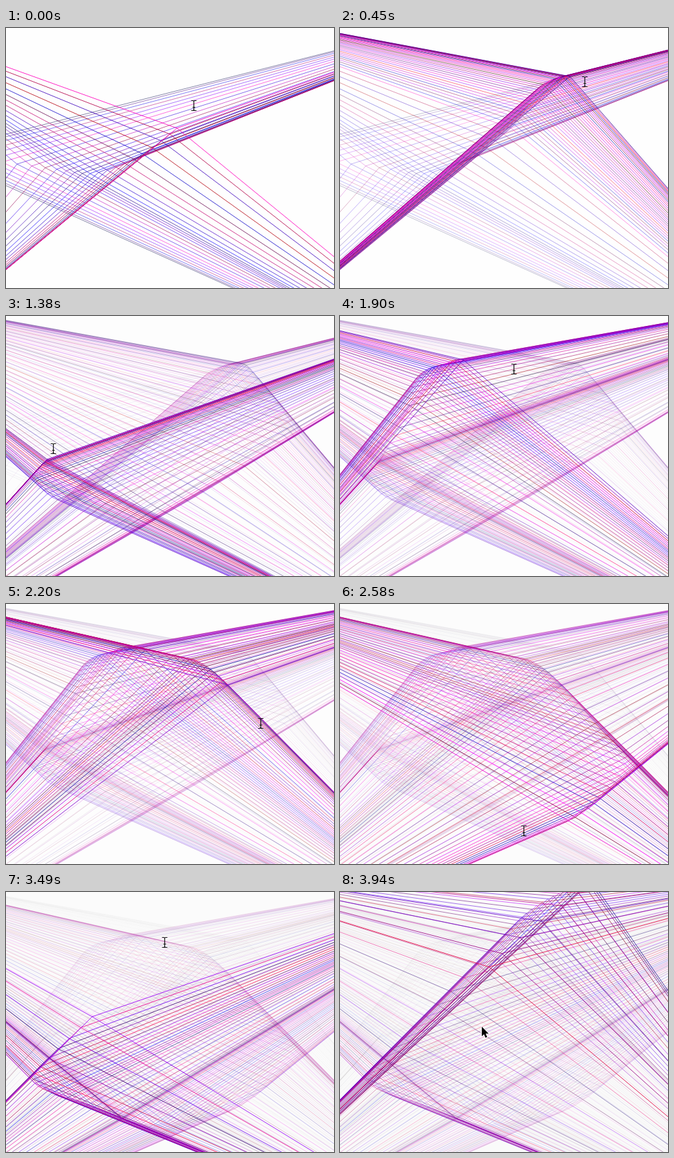
Animation of 495x392 px, one loop 4.04 s. Source, as an HTML page with a canvas:

```html
<!DOCTYPE html>
<html lang="en">
<head>
<meta charset="utf-8">
<title>Pointer lines</title>
<style>
html, body { margin: 0; width: 100%; height: 100%; overflow: hidden; background: #fefefe; }
canvas { display: block; }
</style>
</head>
<body>
<canvas id="stage" width="495" height="392"></canvas>
<script>
const W = 495, H = 392, LOOP = 4040;
const STEP_MS = 97, FIRST_STEP_MS = 22, LAST_STEP = 41;
const RAYS_PER_STEP = 6;
const ctx = document.getElementById('stage').getContext('2d');

// Far corners of the larger canvas that the stage looks into
const center = { x: 261, y: 279 }, reach = { x: 551, y: 325 };
const corners = [-1, 1].flatMap(sx => [-1, 1].map(sy =>
  [center.x + sx * reach.x, center.y + sy * reach.y]));

// The pointer passes the points of each leg at an even pace
const start = [-110, 188], end = [214, 203];
const legs = [
  { steps: 4, points: [[-30, 199], [70, 212], [132, 219], [195, 196], [258, 151]] },
  { steps: 10, points: [[284, 117], [300, 90], [325, 76], [347, 73], [370, 81], [425, 170], [340, 238], [248, 287]] },
  { steps: 5, points: [[150, 283], [78, 277], [50, 252], [46, 235], [56, 222], [62, 216]] },
  { steps: 5, points: [[72, 200], [102, 145], [112, 100], [130, 81], [155, 73], [186, 66]] },
  { steps: 7, points: [[263, 80], [297, 90], [335, 122], [385, 180], [430, 232], [400, 285], [345, 327]] },
  { steps: 6, points: [[278, 342], [215, 350], [180, 343], [168, 338], [108, 314]] },
  { steps: 8, points: [[69, 303], [44, 274], [130, 188], [240, 76], [281, 32], [330, 2], [375, -12], [225, 113]] }
];
const knots = [start, ...legs.flatMap(leg => leg.points), end];
const lead = legs[0].steps;

const clamp = (v, max = 1) => Math.max(0, Math.min(max, v));
const mix = (a, b, k) => a + (b - a) * k;

// Position along the knots at a given step
function progress(step) {
  let begin = -lead, knot = 0;
  for (const { steps, points } of legs) {
    if (step <= begin + steps) return knot + (step - begin) / steps * points.length;
    begin += steps;
    knot += points.length;
  }
  return knot;
}

// Catmull-Rom curve through the knots
function curve(s) {
  const last = knots.length - 1;
  const i = clamp(Math.floor(s), last - 1), u = s - i;
  const [a, b, c, d] = [-1, 0, 1, 2].map(n => knots[clamp(i + n, last)]);
  return [0, 1].map(k => b[k] + u / 2 * (c[k] - a[k]
    + u * (2 * a[k] - 5 * b[k] + 4 * c[k] - d[k]
    + u * (3 * (b[k] - c[k]) + d[k] - a[k]))));
}

let seed = 77;
function random() {
  seed = (seed * 16807) % 2147483647;
  return seed / 2147483647;
}

const rays = Array.from({ length: (lead + LAST_STEP) * RAYS_PER_STEP + 1 }, (_, i) => {
  const step = i / RAYS_PER_STEP - lead;
  const color = [255 * random() ** 0.8, 0, 255 * random() ** 0.6];
  return { step, point: curve(progress(step)), color };
});

function drawRay({ step, point, color }, now) {
  const age = now - step;
  const alpha = 0.03 + 0.92 * Math.exp(-age / 6.5);
  const gray = clamp((age - 13) / 10);
  const rgb = color.map(c => Math.round(mix(c, 150, gray)));
  ctx.strokeStyle = `rgba(${rgb}, ${alpha})`;
  ctx.beginPath();
  for (const corner of corners) {
    ctx.moveTo(...point);
    ctx.lineTo(...corner);
  }
  ctx.stroke();
}

function drawTextCursor(x, y) {
  ctx.strokeStyle = '#111';
  ctx.lineWidth = 1.2;
  ctx.stroke(new Path2D(`M${x - 4} ${y - 7.5}h2.5q1.5 0 1.5 1.5q0-1.5 1.5-1.5h2.5
    M${x} ${y - 6}v12 M${x - 4} ${y + 7.5}h2.5q1.5 0 1.5-1.5q0 1.5 1.5 1.5h2.5
    M${x - 2} ${y + 2.5}h4`));
}

function drawArrow(x, y) {
  const shape = new Path2D(`M${x} ${y}v14.5l3.3-3.1l2.3 5.3l2.5-1.1l-2.3-5.1h4.5z`);
  ctx.lineWidth = 1.6;
  ctx.strokeStyle = '#fff';
  ctx.stroke(shape);
  ctx.fillStyle = '#000';
  ctx.fill(shape);
}

function draw(step) {
  const paper = Math.round(254 - 4 * (step / LAST_STEP) ** 2);
  ctx.fillStyle = `rgb(${paper}, ${paper}, ${paper})`;
  ctx.fillRect(0, 0, W, H);
  ctx.lineWidth = 0.9;
  for (const ray of rays) {
    if (ray.step <= step) drawRay(ray, step);
  }
  // The lines trail the pointer by one knot
  const [x, y] = curve(progress(step) + 1).map(Math.round);
  if (step === LAST_STEP) drawArrow(x, y);
  else drawTextCursor(x - 0.5, y);
}

let shown = -1;
function tick() {
  const t = performance.now() % LOOP;
  const step = clamp(Math.floor((t - FIRST_STEP_MS) / STEP_MS) + 1, LAST_STEP);
  if (step !== shown) draw(shown = step);
  requestAnimationFrame(tick);
}
tick();
</script>
</body>
</html>
```
